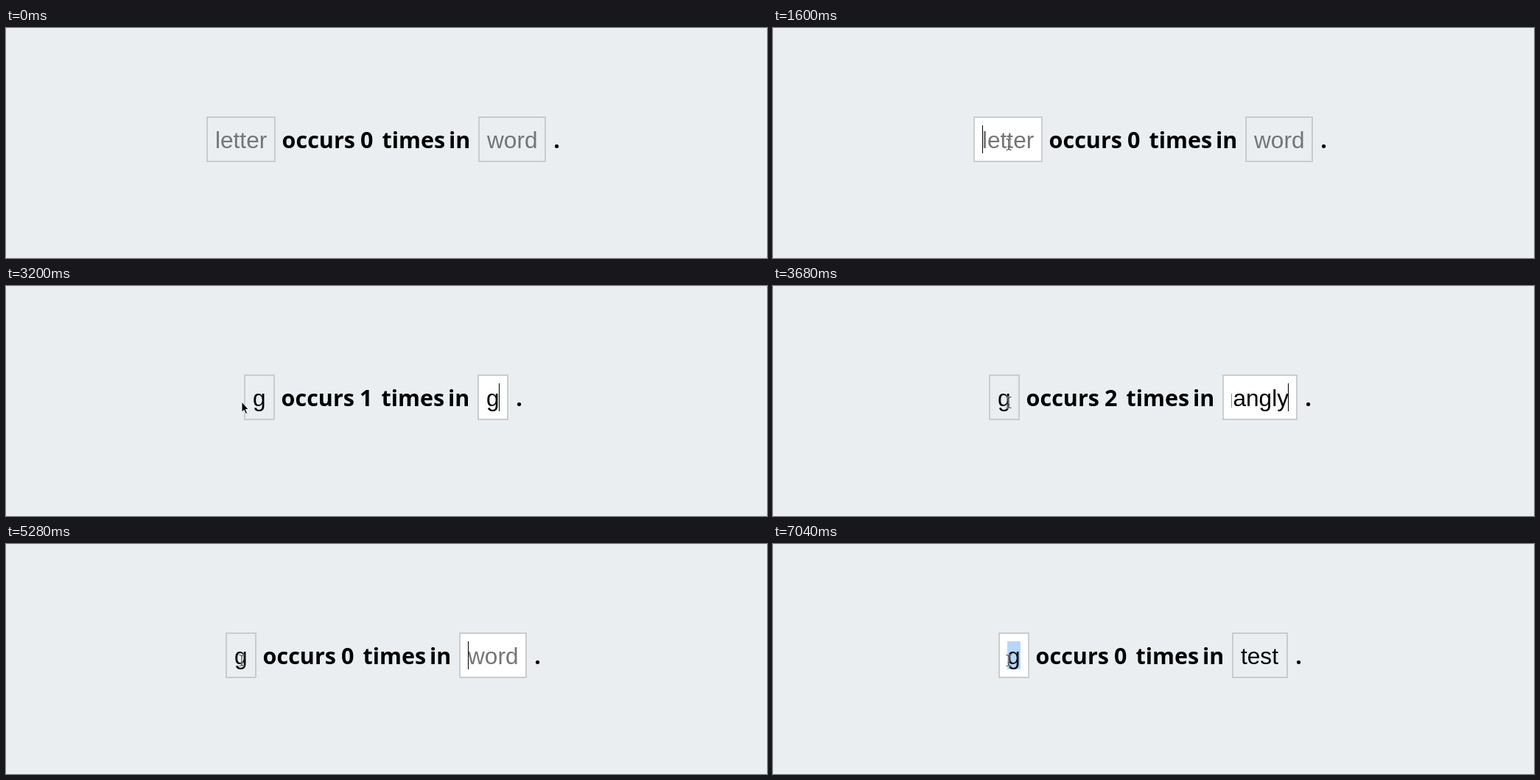
An HTML page that plays this animation: 1033x312 px, repeating every 8000 ms.

```html
<!DOCTYPE html>
<html lang="en">
<head>
<meta charset="utf-8">
<title>Letter counter</title>
<style>
  html, body { margin: 0; width: 100%; height: 100%; overflow: hidden; background: #eaeef1; }
  #stage { display: block; width: 1033px; height: 312px; }
  .line { font: 700 30.5px "Open Sans", "Noto Sans", sans-serif; fill: #000; }
  .field text { font: 31.6px "Liberation Sans", Arial, sans-serif; fill: #000; }
  .field .hint { fill: #757575; }
  .frame { fill: none; stroke: #c9cccd; stroke-width: 2; }
  .focus .frame { fill: #fff; stroke: #ccc; }
  .pick { fill: #b3d7ff; }
</style>
</head>
<body>
<svg id="stage" viewBox="0 0 1033 312">
  <g class="field" id="letter">
    <rect class="frame" x="1" y="121" height="60"/>
    <rect class="pick" x="12" y="132" width="18" height="38"/>
    <svg class="clip" x="12" y="122" height="58"><text y="41"></text></svg>
    <rect class="caret" y="132" width="1" height="38"/>
  </g>
  <g class="line" id="middle">
    <text x="8.6" y="163">occurs</text>
    <text x="115" y="163" id="count">0</text>
    <text x="144.5" y="163">times</text>
    <text x="235" y="163">in</text>
  </g>
  <g class="field" id="word">
    <rect class="frame" x="1" y="121" height="60"/>
    <rect class="pick" x="12" y="132" width="18" height="38"/>
    <svg class="clip" x="12" y="122" height="58"><text y="41"></text></svg>
    <rect class="caret" y="132" width="1" height="38"/>
  </g>
  <text class="line" id="stop" y="163">.</text>
  <g id="mouse">
    <path id="arrow" d="M0 -1V13.2L3.2 10.4L5.4 15.4L7.6 14.4L5.5 9.5H9.4Z"
      fill="#000" stroke="#fff" stroke-width="1" stroke-linejoin="round"/>
    <g id="beam" fill="none">
      <path d="M-3.5 -7.5Q0 -7.5 0 -5Q0 -7.5 3.5 -7.5M0 -5V5M-3.5 7.5Q0 7.5 0 5Q0 7.5 3.5 7.5M-1.5 3H1.5"
        stroke="#fff" stroke-opacity=".65" stroke-width="2.6"/>
      <path d="M-3.5 -7.5Q0 -7.5 0 -5Q0 -7.5 3.5 -7.5M0 -5V5M-3.5 7.5Q0 7.5 0 5Q0 7.5 3.5 7.5M-1.5 3H1.5"
        stroke="#333" stroke-width="1.1"/>
    </g>
  </g>
</svg>
<script>
const LOOP = 8000, GAP = 275;
const $ = id => document.getElementById(id);

// Each step changes only the values it names; caret is measured from the field's left edge.
const steps = [
  [0, { a: '', wa: 94, b: '', wb: 92, focus: '', caret: 0, pick: false }],
  [1280, { focus: 'letter', caret: 12 }],
  [1760, { caret: 0 }],
  [2080, { a: 'g', caret: 29 }],
  [2240, { wa: 42 }],
  [2560, { caret: 0 }],
  [3040, { focus: 'word', caret: 12 }],
  [3200, { b: 'g', wb: 42, caret: 29 }],
  [3360, { b: 'ga', wb: 60, caret: 47 }],
  [3520, { b: 'gang', wb: 94, caret: 81 }],
  [3680, { b: 'gangly', wb: 102, caret: 89 }],
  [3840, { wb: 118, caret: 104 }],
  [4160, { caret: 0 }],
  [4640, { b: 'gangl', wb: 102, caret: 89 }],
  [5120, { b: 'ga', wb: 60, caret: 47 }],
  [5280, { b: '', wb: 92, caret: 12 }],
  [5760, { caret: 0 }],
  [5920, { b: 't', wb: 32, caret: 20 }],
  [6080, { b: 'te', wb: 50, caret: 37 }],
  [6240, { b: 'test', wb: 76, caret: 62 }],
  [6720, { caret: 0 }],
  [7040, { focus: 'letter', pick: true }]
];

const trail = [
  [480, 287, 208], [640, 306, 184], [800, 323, 152], [960, 321, 156],
  [1280, 321, 157], [1440, 320, 157], [1600, 320, 158]
];

const stateAt = t => Object.assign({}, ...steps.filter(s => s[0] <= t).map(s => s[1]));
const show = (el, on) => el.setAttribute('visibility', on ? 'visible' : 'hidden');
const move = (el, x, y = 0) => el.setAttribute('transform', `translate(${x} ${y})`);

function drawField(id, x, w, value, s) {
  const box = $(id), part = q => box.querySelector(q), text = part('text');
  const active = s.focus === id;
  move(box, x);
  box.classList.toggle('focus', active);
  part('.frame').setAttribute('width', w - 2);
  part('.clip').setAttribute('width', w - 23);
  text.textContent = value || id;
  text.classList.toggle('hint', !value);
  // Text wider than its field scrolls to keep the end in view.
  const over = value ? text.getComputedTextLength() - (w - 24) : 0;
  text.setAttribute('x', over > 4 ? -over : 0);
  part('.caret').setAttribute('x', s.caret);
  show(part('.caret'), active && s.caret);
  show(part('.pick'), active && s.pick);
}

function drawMouse(t, left, w) {
  const spot = trail.filter(p => p[0] <= t).pop();
  const [, x, y] = spot || [0, 0, 0];
  const inside = x >= left + 2 && x < left + w - 2 && y >= 122 && y < 180;
  move($('mouse'), x, y);
  show($('arrow'), spot && !inside);
  show($('beam'), spot && inside);
}

function draw(t) {
  const s = stateAt(t);
  const left = 272 + (186 - s.wa - s.wb) / 2;
  const mid = left + s.wa, right = mid + GAP;
  drawField('letter', left, s.wa, s.a, s);
  drawField('word', right, s.wb, s.b, s);
  move($('middle'), mid);
  $('count').textContent = s.a ? s.b.split(s.a).length - 1 : 0;
  $('stop').setAttribute('x', right + s.wb + 10.2);
  drawMouse(t, left, s.wa);
}

const start = performance.now();
function tick() {
  draw((performance.now() - start) % LOOP);
  requestAnimationFrame(tick);
}
tick();
</script>
</body>
</html>
```
